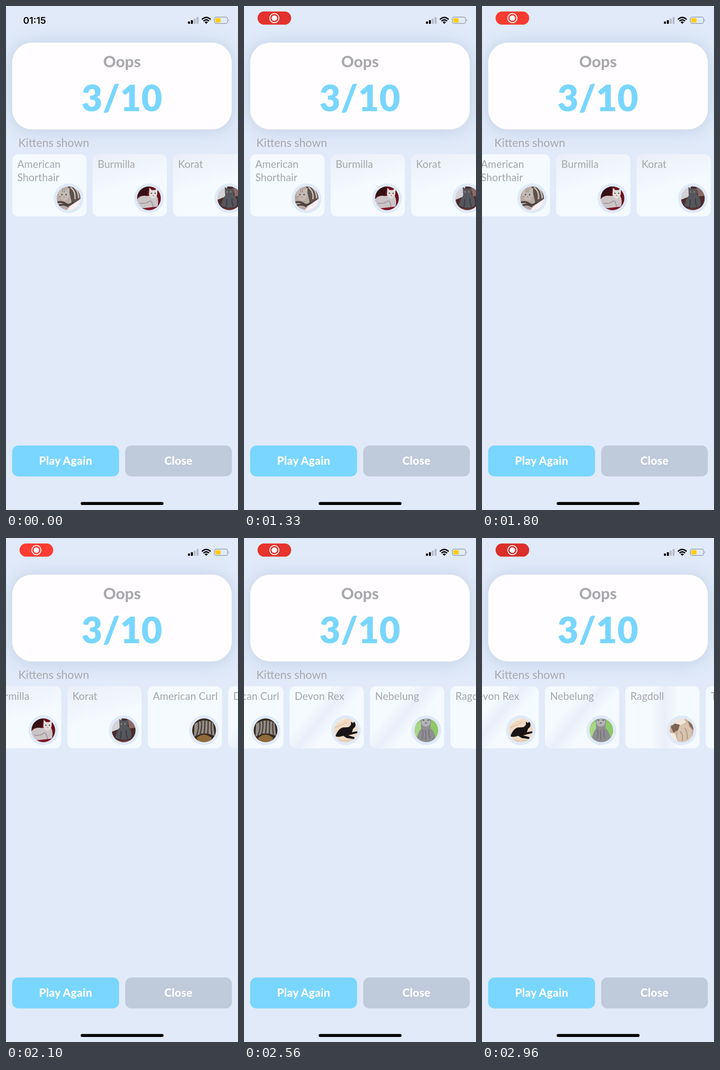
An HTML page that plays this animation: 508x1102 px, repeating every 3000 ms.

```html
<!DOCTYPE html>
<html lang="en">
<head>
<meta charset="utf-8">
<title>Quiz result</title>
<style>
  html, body { margin: 0; width: 100%; height: 100%; overflow: hidden; background: #e0eaf9; }
  svg { display: block; width: 100%; height: 100%; }
  text { font-family: Lato, "Open Sans", sans-serif; fill: #a9a9ae; }
  .label { font-size: 24.8px; }
  .breed { font-size: 22.6px; fill: #a6a6ac; letter-spacing: .1px; }
  .button { font-size: 24.3px; font-weight: 800; fill: #fff; text-anchor: middle; letter-spacing: .35px; }
  .clock { font: 600 20.6px Inter, Roboto, sans-serif; fill: #000; }
</style>
</head>
<body>
<svg viewBox="0 0 508 1102" xmlns="http://www.w3.org/2000/svg">
  <defs>
    <filter id="shadow" x="-20%" y="-50%" width="140%" height="200%">
      <feGaussianBlur stdDeviation="20"/>
    </filter>
    <filter id="soft" x="-10%" y="-10%" width="120%" height="120%">
      <feGaussianBlur stdDeviation=".7"/>
    </filter>
    <clipPath id="round"><circle r="26"/></clipPath>
  </defs>
  <rect width="508" height="1102" fill="#e0eaf9"/>

  <rect x="13.5" y="82" width="481" height="190" rx="44" fill="#5f7d9f" opacity=".25" filter="url(#shadow)"/>
  <rect x="13.5" y="80" width="481" height="190" rx="44" fill="#fffdff"/>
  <text x="254" y="134" font-size="34.5" font-weight="800" text-anchor="middle">Oops</text>
  <text x="254" y="230" font-size="79" font-weight="900" text-anchor="middle" letter-spacing=".5" style="fill:#79d6ff">3/10</text>
  <text class="label" x="27" y="308">Kittens shown</text>

  <g id="list"></g>

  <rect x="13.5" y="961" width="234" height="67.5" rx="13.5" fill="#79d6ff"/>
  <text class="button" x="130.5" y="1002.5">Play Again</text>
  <rect x="261" y="961" width="233.5" height="67.5" rx="13.5" fill="#bfcada"/>
  <text class="button" x="377.5" y="1002.5">Close</text>
  <rect x="163.5" y="1084.5" width="181.5" height="6.6" rx="3.3"/>

  <text id="clock" class="clock" x="37.5" y="38.5">01:15</text>
  <g id="record">
    <rect id="pill" x="29.7" y="12" width="73.6" height="28.8" rx="14.2"/>
    <circle cx="66.5" cy="26.4" r="10" fill="none" stroke="#fff" stroke-width="1.9"/>
    <circle cx="66.5" cy="26.4" r="6" fill="#fff"/>
  </g>

  <rect x="398.4" y="33.8" width="4.4" height="5.2" rx="1.2"/>
  <rect x="404.8" y="31" width="4.4" height="8" rx="1.2"/>
  <rect x="411.1" y="27.6" width="4.4" height="11.4" rx="1.2" fill="#b4bbc8"/>
  <rect x="417.4" y="24" width="4.4" height="15" rx="1.2" fill="#b4bbc8"/>
  <g fill="none" stroke="#000" stroke-width="3">
    <path d="M429 29.3 Q438.5 20.8 448 29.3"/>
    <path d="M432.4 33 Q438.5 27.4 444.6 33"/>
  </g>
  <path d="M434.8 35.3 Q438.5 32.2 442.2 35.3 L438.5 39Z"/>
  <rect x="456.2" y="24.2" width="29" height="14" rx="4.2" fill="none" stroke="#959ca8" stroke-width="1.4"/>
  <rect x="458.4" y="26.4" width="11.4" height="9.7" rx="2.2" fill="#fc0"/>
  <path d="M487 28.8 Q489.6 31.2 487 33.6Z" fill="#959ca8"/>
</svg>
<script>
const LOOP = 3000, PITCH = 176;
const byId = id => document.getElementById(id);
const clamp = v => Math.max(0, Math.min(1, v));
const shape = (fill, d) => `<path fill="${fill}" d="${d}"/>`;
const oval = (fill, x, y, rx, ry = rx) => `<ellipse fill="${fill}" cx="${x}" cy="${y}" rx="${rx}" ry="${ry}"/>`;
const back = fill => oval(fill, 0, 0, 30);
const lines = (color, width, d) => `<path fill="none" stroke="${color}" stroke-width="${width}" d="${d}"/>`;
const eyes = (x, y, gap, fill) => oval(fill, x - gap, y, 1.4) + oval(fill, x + gap, y, 1.4);

// Each photo is drawn around its own centre, in a circle of radius 26.
const photos = {
  tabby: () => back("#b9aaa4") +
    shape("#5f524d", "M-2-28H28V8L8 13Z") +
    lines("#c9beb6", 3, "M4-24Q16-16 14 2M12-24Q22-16 22 0") +
    shape("#c3bab3", "M-22-10L-21-23-13-18-5-18 2-23V-8Q-1 5-10 5-19 4-22-10Z") +
    lines("#4b413e", 4, "M-25 9Q-14 6-6 12T10 8M-24 17Q-12 10 0 18") +
    shape("#fdeff2", "M28 0L6 15-6 28H28Z") +
    lines("#7c706a", 1.2, "M-13-18V-13M-9-18V-13M-21-3L-16-4") +
    eyes(-10, -8, 4.5, "#3e3835") + oval("#b5807a", -10, -3, 1.6, 1),
  silver: () => back("#6a111c") +
    shape("#351015", "M-28-28H0L-4-6-28-4Z") +
    shape("#cbc4c6", "M-26 2Q-18-8-4-5L4-6 17-6Q23 6 18 20L4 24-24 20Z") +
    shape("#e0dbda", "M0-8L1-23 6-18 13-18 19-23 18-8Q14 1 9 1 3 0 0-8Z") +
    lines("#9f979b", 2, "M-20 10Q-8 14 3 5M4 5Q10 14 8 21") +
    shape("#7e1726", "M-24 23L28 17V28H-24Z") +
    eyes(9.5, -11, 4, "#4c5146") + oval("#b17876", 9.5, -6, 1.5, 1),
  slate: () => back("#4b2c2c") +
    shape("#d3d2d5", "M-28-28H-4L-8-4-28 4Z") +
    shape("#8a6a66", "M8-28H28V-6L12-4Z") +
    shape("#55575d", "M-18 16Q-16 2-9-6L-10-25-4-21 4-21 10-24 9-8Q20 2 16 17 0 25-18 16Z") +
    lines("#3c3d43", 2.5, "M-6 2Q-5 12-8 20M6 0Q5 12 9 18") +
    lines("#7d4543", 2, "M-22 19Q0 30 22 19") +
    eyes(-1, -14, 4, "#a79a62"),
  striped: () => back("#35291f") +
    shape("#958d85", "M-21-14Q0-28 20-16L23 12 8 7-6 7-22 14Z") +
    lines("#453d37", 2.6, "M-13-19Q-10-4-17 12M-6-22Q-4-6-9 9M2-22Q2-8 0 8M9-21Q9-6 8 8M16-18Q15-4 17 10") +
    shape("#8f6a3b", "M-17 17Q0 2 17 17L10 28H-10Z"),
  black: () => back("#f0dac4") +
    shape("#f8e9da", "M-28-8Q-8-24 12-28L-28-28Z") +
    lines("#ddc0a5", 2, "M-24-6Q-8-12 2-18M-18 20Q-2 26 16 20") +
    shape("#191517", "M-23 13Q-18-2-8-6L6-7 11-12 11-19 15-16 20-20 21-11Q20-6 16-4L13 4 25 2V6L13 9 5 11 19 15 18 19 2 17-6 12Q-16 16-23 13Z"),
  grey: () => back("#8fc868") +
    shape("#a8d886", "M-28-8L-10-22-14 10-28 14Z") +
    shape("#8e8e92", "M-20 28Q-22 8-11-4L-13-28H11L9-5Q22 6 20 28Z") +
    oval("#b2b2b5", -1, -17, 10, 9) +
    lines("#737378", 2, "M-9-2Q-5 8-10 20M-2 0Q0 8-2 22M6-2Q4 9 9 19") +
    eyes(-1, -22, 5, "#54574d") + oval("#65656a", -1, -16, 2, 1.3),
  cream: () => back("#cbb19b") +
    shape("#eee5dc", "M-28-28H4L10-17-8-9-28-14Z") +
    shape("#d8c4b0", "M-8-10L14-16Q24-4 22 28H-10Z") +
    shape("#7d6455", "M-24-8L-15-15-4-12-8 0-18 5Z") +
    lines("#b0927a", 2, "M-4 2Q5 10 1 23M6-6Q14 4 12 20M-16 9Q-10 16-13 22") +
    shape("#f3ebe3", "M-28 4L-14 8-8 28H-28Z") +
    shape("#8a6c5a", "M14-20L23-13 28 2 17-9Z")
};

// Sheens: end of the gradient vector, where the band lies on it, half its width.
const plain = [1, 1, -1, .2];
const corner = [.35, 1, 0, .6];
const diagonal = [1, .7, .53, .16];
const upright = [1, 0, .53, .17];

const cards = [
  [["American", "Shorthair"], "tabby", plain],
  [["Burmilla"], "silver", corner],
  [["Korat"], "slate", corner],
  [["American Curl"], "striped", plain],
  [["Devon Rex"], "black", diagonal],
  [["Nebelung"], "grey", diagonal],
  [["Ragdoll"], "cream", upright],
  [["Tonkinese"], "grey", plain]
];

function sheen(id, [x, y, band, half]) {
  const stop = (at, color) => `<stop offset="${at}" stop-color="${color}"/>`;
  return `<linearGradient id="${id}" x1="0" y1="0" x2="${x}" y2="${y}">
    ${stop(clamp(band - half), "#f4faff")}
    ${band < 0 ? "" : stop(band, "#eaeefa")}
    ${stop(clamp(band + half), "#f4faff")}
  </linearGradient>`;
}

function card([names, photo, light], i) {
  const text = names.map((n, k) => `<text class="breed" x="11" y="${353.5 + 29.5 * k}">${n}</text>`).join("");
  return `<g transform="translate(${13.7 + PITCH * i} 0)">
    ${sheen("sheen" + i, light)}
    <rect y="324" width="162.5" height="136" rx="13" fill="url(#sheen${i})"/>
    ${text}
    <g transform="translate(123.3 420.5)">
      <circle r="32.5" fill="#dfe9f8"/>
      <g clip-path="url(#round)"><g filter="url(#soft)">${photos[photo]()}</g></g>
    </g>
  </g>`;
}
byId("list").innerHTML = cards.map(card).join("");

function hermite(u, a, b, va, vb) {
  const u2 = u * u, u3 = u2 * u;
  return a * (2 * u3 - 3 * u2 + 1) + va * (u3 - 2 * u2 + u) + b * (3 * u2 - 2 * u3) + vb * (u3 - u2);
}

// A slow drag, a flick, then inertia that dies away.
function scrollAt(t) {
  if (t < 1580) return 0;
  if (t < 1800) return 27 * ((t - 1580) / 220) ** 2.4;
  if (t < 2100) return hermite((t - 1800) / 300, 27, 230, 88, 390);
  return 230 + 634.5 * (1 - Math.exp((2100 - t) / 488));
}

function draw(t) {
  byId("list").setAttribute("transform", `translate(${-scrollAt(t).toFixed(2)} 0)`);

  const shown = clamp((t - 150) / 300);
  const ease = shown * shown * (3 - 2 * shown);
  const size = .8 + .2 * ease;
  byId("clock").setAttribute("opacity", 1 - ease);
  byId("record").setAttribute("opacity", ease);
  byId("record").setAttribute("transform", `translate(66.5 26.4) scale(${size}) translate(-66.5 -26.4)`);

  const glow = .5 - .5 * Math.cos((t - 1000) / 1960 * 2 * Math.PI);
  const mix = (a, b) => Math.round(a + (b - a) * glow);
  byId("pill").setAttribute("fill", `rgb(${mix(218, 255)},${mix(47, 60)},${mix(43, 49)})`);
}

const start = performance.now();
function tick() {
  draw((performance.now() - start) % LOOP);
  requestAnimationFrame(tick);
}
draw(0);
requestAnimationFrame(tick);
</script>
</body>
</html>
```
